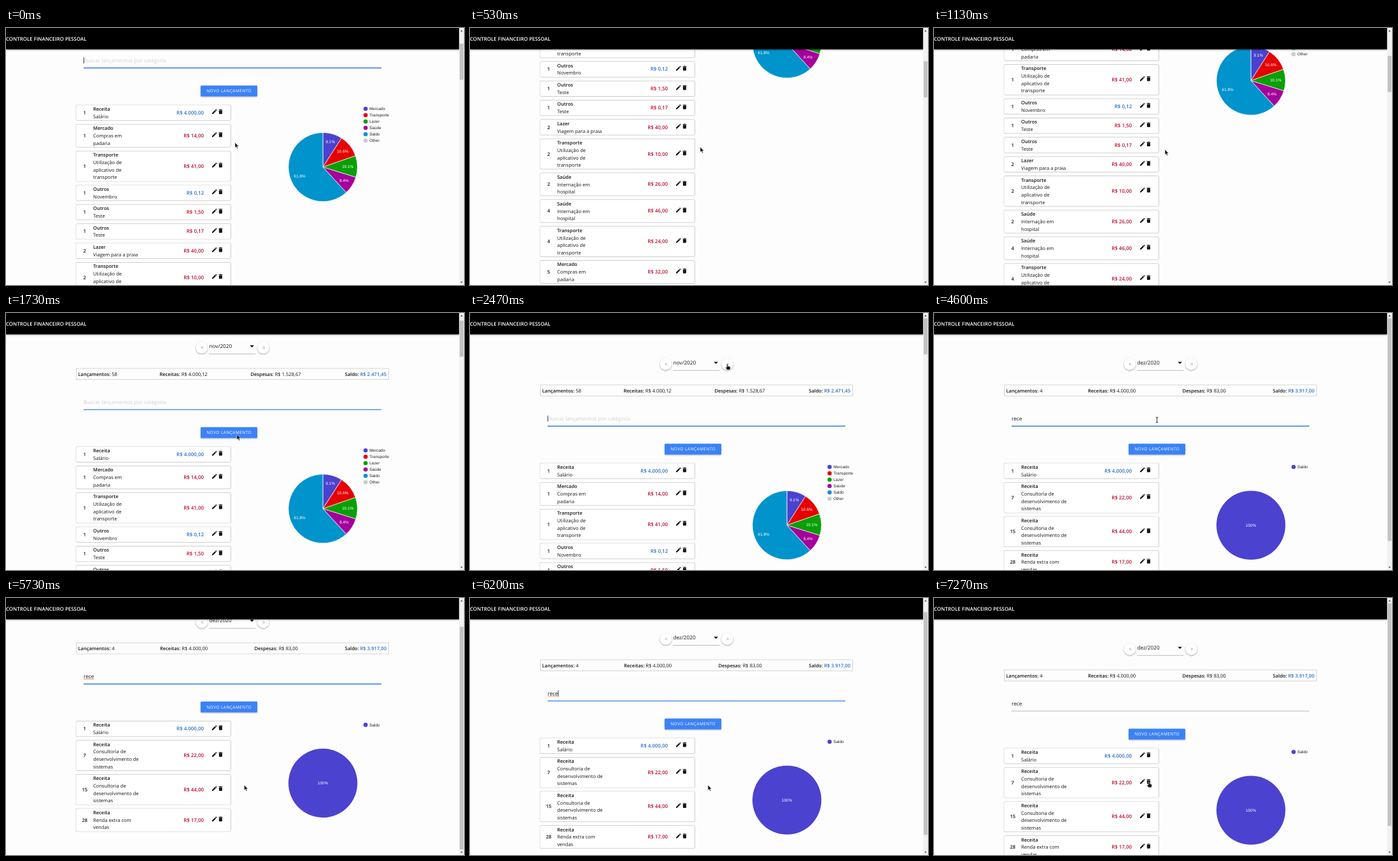
These frames come from a looping animation (720 px wide and 404 px high, 8 s). An HTML page:

```html
<!DOCTYPE html>
<html lang="pt-BR">
<head>
<meta charset="utf-8">
<title>Controle financeiro pessoal</title>
<style>
  html, body { margin: 0; width: 100%; height: 100%; overflow: hidden; background: #fdfdfe; }
  svg { display: block; width: 720px; height: 404px; }
  text { font: 7.6px "Open Sans", "Noto Sans", sans-serif; fill: #151515; white-space: pre; text-rendering: geometricPrecision; }
  .b { font-weight: 600; font-size: 7.5px; }
  .money { font-weight: 600; font-size: 7.9px; }
  .in { fill: #2b70c2; }
  .out { fill: #bd0d2d; }
  .field { font-size: 8.2px; }
  .chart { font: 6.4px "Liberation Sans", Arial, sans-serif; fill: #222; }
  .pct { fill: #fff; }
  .card { fill: #fff; stroke: #000; stroke-opacity: .17; stroke-width: .6; filter: drop-shadow(0 .9px .7px rgba(0,0,0,.38)); }
  .round { fill: #fff; filter: drop-shadow(0 1px 1px rgba(0,0,0,.35)); }
</style>
</head>
<body>
<svg id="stage" viewBox="0 0 720 404" xmlns="http://www.w3.org/2000/svg"></svg>
<script>
const LOOP = 8000, TICK = 200 / 3;
const svg = document.getElementById('stage');

function el(parent, tag, attrs = {}, text) {
  const node = document.createElementNS('http://www.w3.org/2000/svg', tag);
  set(node, attrs);
  if (text !== undefined) node.textContent = text;
  parent.appendChild(node);
  return node;
}
function set(node, attrs) {
  for (const key in attrs) node.setAttribute(key, attrs[key]);
}
function show(node, on) {
  node.style.display = on ? '' : 'none';
}
// Text whose capitals are centred on y
function label(parent, x, y, text, cls = '', anchor = 'start', rise = 2.8) {
  return el(parent, 'text', { x, y: y + rise, class: cls, 'text-anchor': anchor }, text);
}

const EDIT = 'M3 17.25V21h3.75L17.81 9.94l-3.75-3.75zM20.71 7.04c.39-.39.39-1.02 0-1.41l-2.34-2.34c-.39-.39-1.02-.39-1.41 0l-1.83 1.83 3.75 3.75z';
const TRASH = 'M6 19c0 1.1.9 2 2 2h8c1.1 0 2-.9 2-2V7H6zM19 4h-3.5l-1-1h-5l-1 1H5v2h14z';
const COLORS = ['#4b42cf', '#e60000', '#08a005', '#a4009b', '#0093cc', '#cccccc'];

const RIDE = 'Utilização de|aplicativo de|transporte';
const CLINIC = 'Internação em|hospital';
const CONSULT = 'Consultoria de|desenvolvimento de|sistemas';
const TRIP = 'Viagem para a praia';

// Rows: day, category, description, amount, income flag
const SCENES = {
  nov: {
    month: 'nov/2020', height: 2732,
    totals: ['58', 'R$ 4.000,12', 'R$ 1.528,67', 'R$ 2.471,45'], columns: [241.5, 384.5],
    names: ['Mercado', 'Transporte', 'Lazer', 'Saúde', 'Saldo', 'Other'],
    shares: [9.1, 10.6, 10.1, 8.4, 61.8],
    rows: [
      [1, 'Receita', 'Salário', '4.000,00', 1],
      [1, 'Mercado', 'Compras em|padaria', '14,00'],
      [1, 'Transporte', RIDE, '41,00'],
      [1, 'Outros', 'Novembro', '0,12', 1],
      [1, 'Outros', 'Teste', '1,50'],
      [1, 'Outros', 'Teste', '0,17'],
      [2, 'Lazer', TRIP, '40,00'],
      [2, 'Transporte', RIDE, '10,00'],
      [2, 'Saúde', CLINIC, '26,00'],
      [4, 'Saúde', CLINIC, '46,00'],
      [4, 'Transporte', RIDE, '24,00'],
      [5, 'Mercado', 'Compras em|padaria', '32,00'],
      [5, 'Lazer', TRIP, '18,00'],
      [6, 'Transporte', RIDE, '12,00'],
      [7, 'Saúde', CLINIC, '38,00'],
      [8, 'Transporte', RIDE, '16,00']
    ]
  },
  dez: {
    month: 'dez/2020', height: 2985,
    totals: ['65', 'R$ 4.000,02', 'R$ 1.530,01', 'R$ 2.470,01'], columns: [241.5, 384.5],
    names: ['Lazer', 'Mercado', 'Transporte', 'Saúde', 'Saldo', 'Other'],
    shares: [6.8, 9.7, 11.2, 9.2, 63.1],
    rows: [
      [1, 'Receita', 'Salário', '4.000,00', 1],
      [1, 'Lazer', TRIP, '20,00'],
      [1, 'Mercado', 'Compras em|hortifruti', '41,01'],
      [1, 'Outros', 'Dezembro', '0,02', 1],
      [2, 'Transporte', RIDE, '21,00']
    ]
  },
  found: {
    month: 'dez/2020', height: 447,
    totals: ['4', 'R$ 4.000,00', 'R$ 83,00', 'R$ 3.917,00'], columns: [242, 390.5],
    names: ['Saldo'],
    shares: [100],
    rows: [
      [1, 'Receita', 'Salário', '4.000,00', 1],
      [7, 'Receita', CONSULT, '22,00'],
      [15, 'Receita', CONSULT, '44,00'],
      [28, 'Receita', 'Renda extra com|vendas', '17,00']
    ]
  }
};

function drawTotals(g, scene) {
  const heads = ['Lançamentos:', 'Receitas:', 'Despesas:', 'Saldo:'];
  const xs = [113.5, ...scene.columns, 598];
  heads.forEach((head, i) => {
    const last = i === 3;
    const line = label(g, xs[i], 121.8, '', '', last ? 'end' : 'start');
    el(line, 'tspan', { class: 'b' }, head + ' ');
    el(line, 'tspan', last ? { class: 'in', 'font-weight': 600 } : {}, scene.totals[i]);
  });
}

function drawRows(g, rows) {
  let top = 236;
  for (const [day, category, about, amount, income] of rows) {
    const lines = about.split('|');
    const pitch = 18.7 + 11.65 * lines.length;
    const mid = top + (pitch - 6) / 2;
    el(g, 'rect', { x: 110, y: top, width: 243.5, height: pitch - 6, rx: 1.8, class: 'card' });
    label(g, 123.7, mid - .3, day, 'b', 'middle');
    label(g, 137, top + 6.2, category, 'b');
    lines.forEach((line, i) => label(g, 137, top + 17.9 + 11.65 * i, line));
    label(g, 311, mid - .3, 'R$ ' + amount, 'money ' + (income ? 'in' : 'out'), 'end');
    [[327.7, EDIT], [337.3, TRASH]].forEach(([x, d]) =>
      el(g, 'path', { d, fill: '#151515', transform: `translate(${x - 5} ${mid - 6.7}) scale(.42)` }));
    top += pitch;
  }
}

function drawPie(g, { names, shares }) {
  const cx = 498.2, cy = 333.6, R = 54.2;
  const at = (share, r) => {
    const a = share / 50 * Math.PI;
    return [cx + r * Math.sin(a), cy - r * Math.cos(a)];
  };
  const percent = (x, y, share) => label(g, x, y, share + '%', 'chart pct', 'middle', 2.2);
  if (shares.length === 1) {
    el(g, 'circle', { cx, cy, r: R, fill: COLORS[0] });
    percent(cx, cy, 100);
  } else {
    let from = 0;
    shares.forEach((share, i) => {
      const d = `M${cx} ${cy}L${at(from, R)}A${R} ${R} 0 ${share > 50 ? 1 : 0} 1 ${at(from + share, R)}Z`;
      el(g, 'path', { d, fill: COLORS[i], stroke: '#fff', 'stroke-width': .7 });
      const mid = from + share / 2;
      const r = 42 - 3 * Math.abs(Math.sin(mid / 50 * Math.PI));
      if (share > 7) percent(...at(mid, r), share);
      from += share;
    });
  }
  names.forEach((name, i) => {
    el(g, 'circle', { cx: 565.3, cy: 242 + 10 * i, r: 3.3, fill: COLORS[i] });
    label(g, 571.3, 242 + 10 * i, name, 'chart', 'start', 2.3);
  });
}

// Page
el(svg, 'rect', { width: 720, height: 404, fill: '#fdfdfe' });
const page = el(svg, 'g');
[[307.8, '<'], [404.5, '>']].forEach(([x, sign]) => {
  el(page, 'circle', { cx: x, cy: 80.5, r: 9.3, class: 'round' });
  label(page, x + .7, 80.5, sign, '', 'middle').style.fill = '#777';
});
el(page, 'path', { d: 'M319 90.3H392.5', stroke: '#9e9e9e', 'stroke-width': .7 });
el(page, 'path', { d: 'M383.3 76.7h6.6l-3.3 3.4z', fill: '#111' });
el(page, 'rect', { x: 110.5, y: 113, width: 491, height: 17.5, fill: 'none', stroke: '#ccc', 'stroke-width': .8 });

const hint = label(page, 122, 166, 'Buscar lançamentos por categoria', 'field');
hint.style.fill = '#d0d0d2';
const typed = label(page, 122, 166, '', 'field');
const squiggle = el(page, 'path', { d: 'M122 170.2' + 'q1 -1.4 2 0t2 0'.repeat(4), fill: 'none', stroke: '#e03030', 'stroke-width': .6 });
const caret = el(page, 'rect', { y: 161.2, width: .8, height: 9.6, fill: '#111' });
const rule = el(page, 'path', { d: 'M122 177.8H590' });

el(page, 'rect', { x: 306, y: 205.4, width: 89, height: 17, rx: 1.2, fill: '#3b82f7', style: 'filter:drop-shadow(0 1px 1px rgba(0,0,0,.3))' });
const action = label(page, 350.7, 213.9, 'NOVO LANÇAMENTO', '', 'middle', 2.4);
action.style.cssText = 'fill:#fff;font-size:6.6px;letter-spacing:.4px';

const views = {};
for (const key in SCENES) {
  const g = views[key] = el(page, 'g'), scene = SCENES[key];
  label(g, 319.5, 77.8, scene.month, 'field', 'start', 3);
  drawTotals(g, scene);
  drawRows(g, scene.rows);
  drawPie(g, scene);
}

// Top bar and scrollbar
el(svg, 'rect', { width: 712.5, height: 33.5, style: 'filter:drop-shadow(0 1px 1px rgba(0,0,0,.4))' });
const brand = label(svg, 0, 16.8, 'CONTROLE FINANCEIRO PESSOAL', 'b');
brand.style.cssText = 'fill:#fff;font-size:7.9px';
el(svg, 'rect', { x: 712.5, width: 7.5, height: 404, fill: '#f1f1f1' });
el(svg, 'path', { d: 'M714.3 5.4h3.8l-1.9-2.3zM714.3 398.8h3.8l-1.9 2.3z', fill: '#505050' });
const thumb = el(svg, 'rect', { x: 713.3, width: 5.8, fill: '#c1c1c1' });

// Pointers
const mouse = el(svg, 'g');
const ripple = el(mouse, 'circle', { cy: 1, r: 4, fill: '#5aa5dc', 'fill-opacity': .65 });
const pointers = {
  arrow: el(mouse, 'path', { d: 'M0 0V8.3L1.9 6.6L3.2 9.5L4.6 8.9L3.3 6.1H5.8Z', fill: '#111', stroke: '#fff', 'stroke-width': .5 }),
  beam: el(mouse, 'path', { d: 'M-1.8 -4H1.8M-1.8 4H1.8M0 -4V4', fill: 'none', stroke: '#222', 'stroke-width': .9 }),
  hand: el(mouse, 'path', { d: 'M-.7 .5Q0 -.6 .8 .5V3.4L4 4.2Q5 4.6 4.8 6L4.2 9.2H-.6L-2.8 5.6Q-2.6 4.4 -.7 5.6Z', fill: '#111', stroke: '#fff', 'stroke-width': .4 })
};

// Motion
const SCROLL = [[70, 115], [750, 400], [900, 400], [1133, 251], [1733, 26], [1870, 0], [4800, 0], [5250, 42.6], [5950, 42.6], [6350, 0]];
const MOUSE_X = [[0, 360], [900, 363], [1800, 363], [2450, 404.5], [2750, 404.5], [3200, 350.5], [4650, 350.5], [5400, 374.5], [6150, 374.5], [6850, 337.6]];
const MOUSE_Y = [[0, 180], [900, 191], [1800, 191], [2450, 80], [2750, 80], [3200, 168], [4650, 168], [5400, 294], [6150, 294], [6850, 288.5]];
const FOCUS = [[2600, 1], [2850, 0], [3340, 0], [3590, 1], [7050, 1], [7260, 0]];
const KEYS = [3730, 3860, 4000, 4130];
const CLICKS = [2600, 3340, 7050];

const linear = k => k, smooth = k => k * k * (3 - 2 * k);
function follow(track, t, ease = linear) {
  const i = track.findIndex(point => point[0] > t);
  if (i === 0) return track[0][1];
  if (i < 0) return track[track.length - 1][1];
  const [t0, a] = track[i - 1], [t1, b] = track[i];
  return a + (b - a) * ease((t - t0) / (t1 - t0));
}
const within = (t, a, b) => t >= a && t < b;

function caretOn(t) {
  if (within(t, 2600, 3340) || t >= 7050) return false;
  if (t < 2600) return t % 1000 < 490;
  const since = KEYS.reduce((last, key) => key <= t ? key : last, 3340);
  return (t - since) % 900 < 450;
}

function render(time) {
  const t = Math.floor((time % LOOP + 10) / TICK) * TICK;

  const name = t < 2700 ? 'nov' : t < 3930 ? 'dez' : 'found';
  for (const key in views) show(views[key], key === name);
  const scroll = follow(SCROLL, t);
  set(page, { transform: `translate(0 ${-scroll})` });
  const ratio = 388 / SCENES[name].height;
  set(thumb, { y: 8.3 + scroll * ratio, height: 404 * ratio - .6 });

  const count = KEYS.filter(key => key <= t).length;
  typed.textContent = 'rece'.slice(0, count);
  show(hint, !count);
  show(squiggle, within(t, 4700, 7050));
  show(caret, caretOn(t));
  set(caret, { x: 121.8 + count * 4.15 });
  const focus = follow(FOCUS, t);
  const mix = (a, b) => Math.round(a + (b - a) * focus);
  set(rule, { stroke: `rgb(${mix(158, 55)},${mix(155, 124)},${mix(150, 226)})`, 'stroke-width': .7 + .7 * focus });

  set(mouse, { transform: `translate(${follow(MOUSE_X, t, smooth)} ${follow(MOUSE_Y, t, smooth)})` });
  const kind = within(t, 3080, 4720) ? 'beam' : within(t, 2330, 2850) || t >= 6750 ? 'hand' : 'arrow';
  for (const key in pointers) show(pointers[key], key === kind);
  show(ripple, CLICKS.some(c => within(t, c, c + 140)));
}

function frame(now) {
  render(now);
  requestAnimationFrame(frame);
}
render(0);
requestAnimationFrame(frame);
</script>
</body>
</html>
```
